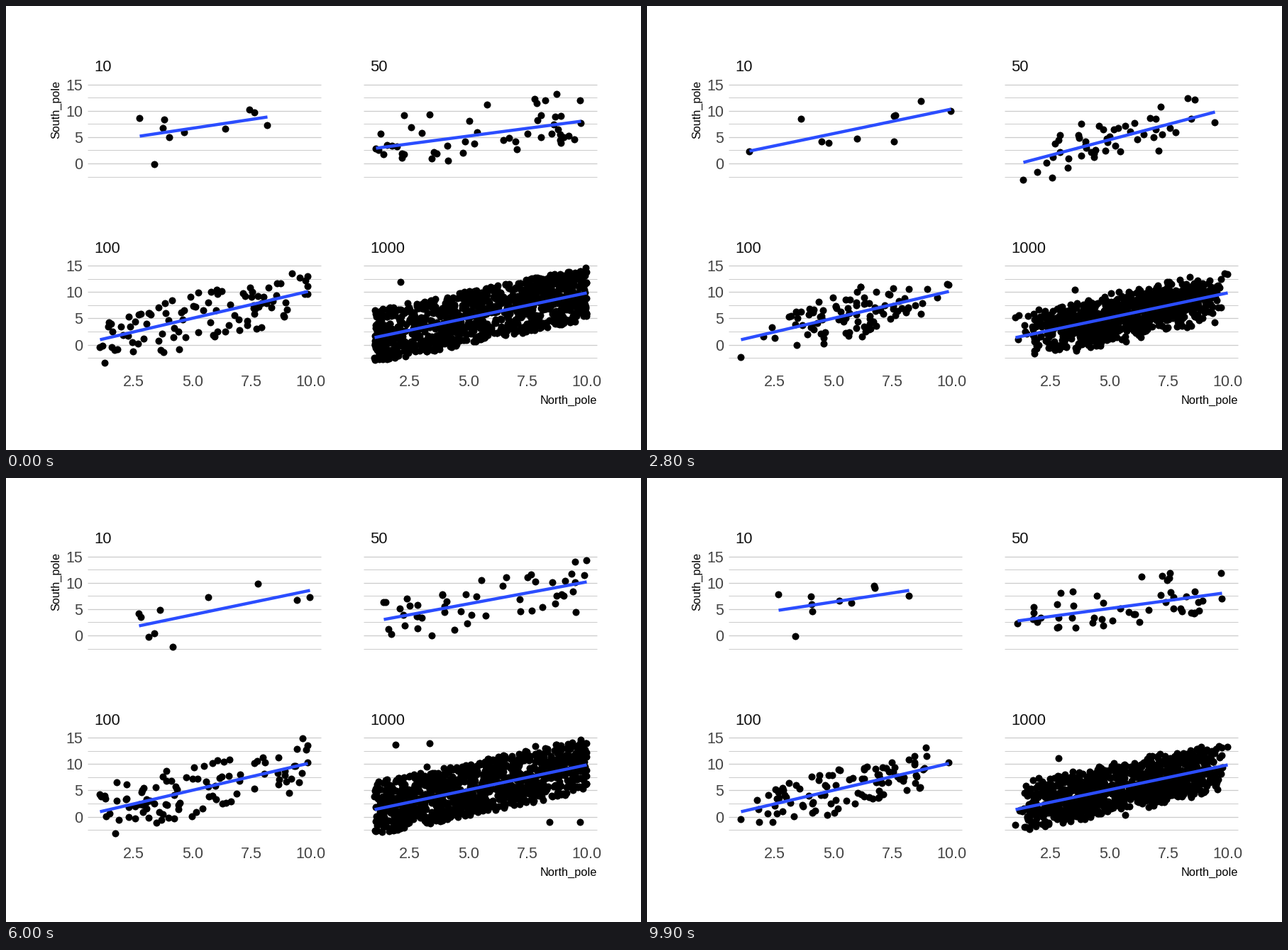
A matplotlib script that plays this animation: 895x626 px, repeating every 10 s.

```python
import numpy as np
import matplotlib.pyplot as plt
from matplotlib.animation import FuncAnimation

W, H, DPI = 895, 626, 64
PT = 72 / DPI                      # points per pixel
STATES, HOLD, MOVE = 10, 5, 5      # frames held and frames in between, per state
X0, Y0 = 96.5, 221.5               # data origin of the first panel
X_UNIT, Y_UNIT = 33.2, 7.43        # pixels per data unit
COL, ROW = 389, 255.5              # panel spacing
FONT = "Liberation Sans"

rng = np.random.default_rng(12)

# Ends of the trend line (x, y, x, y) in each state; small samples wander most
TRENDS = {
    10: [(188, 183, 368, 156), (148, 204, 391, 146), (144, 204, 428, 145),
         (144, 204, 428, 145), (163, 237, 407, 150), (160, 215, 415, 152),
         (187, 208, 428, 158), (166, 206, 395, 144), (166, 206, 395, 144),
         (170, 201, 374, 168)],
    50: [(521, 200, 810, 162), (522, 204, 818, 154), (530, 220, 800, 149),
         (530, 220, 800, 149), (521, 223, 817, 128), (525, 212, 812, 145),
         (532, 199, 818, 146), (527, 216, 797, 151), (527, 216, 797, 151),
         (526, 206, 810, 162)],
    100: [(132, 470, 425, 402)] * STATES,
    1000: [(519, 467, 818, 404)] * STATES,
}


def sample(n, trend):
    """Uniform noise around a line, kept so that its linear fit is that line."""
    x0, y0, x1, y1 = trend
    x = rng.uniform(x0, x1, n)
    x[:2] = x0, x1
    noise = rng.uniform(-5, 5, n) * Y_UNIT
    noise -= np.polyval(np.polyfit(x, noise, 1), x)
    y = y0 + (y1 - y0) * (x - x0) / (x1 - x0) + noise
    strays = n // 150
    y[2:2 + strays] = Y0 + ROW - Y_UNIT * rng.uniform(-3, 14, strays)
    return np.column_stack([x, y])


fig = plt.figure(figsize=(W / DPI, H / DPI), dpi=DPI, facecolor="white")
ax = fig.add_axes([0, 0, 1, 1])
# Whole numbers are pixel centres
ax.set(xlim=(-0.5, W - 0.5), ylim=(H - 0.5, -0.5))
ax.axis("off")


def label(x, y, text, size, color="black", **kw):
    ax.text(x, y, text, fontsize=size * PT, color=color, family=FONT,
            va="baseline", **kw)


def draw_panel(name, dx, dy):
    for value in np.arange(-2.5, 15.1, 2.5):
        major = value % 5 == 0
        y = Y0 + dy - Y_UNIT * value
        ax.plot([115 + dx, 444 + dx], [y, y], color="#cccccc",
                lw=(1.3 if major else 1.0) * PT, solid_capstyle="butt")
        if major and dx == 0:
            label(108, y + 8, f"{value:.0f}", 21.5, "#444444", ha="right")
    if dy:
        for value in (2.5, 5, 7.5, 10):
            label(X0 + dx + X_UNIT * value, 535.5, f"{value:.1f}", 21.5,
                  "#444444", ha="center")
    label(124 + dx, 91.5 + dy, name, 22, "#111111")


layers = []    # (artist, its coordinates in each state)
for i, (n, trends) in enumerate(TRENDS.items()):
    draw_panel(str(n), COL * (i % 2), ROW * (i // 2))
    dots, = ax.plot([], [], "o", color="black", ms=10 * PT, mew=0,
                    snap=False, zorder=3)
    line, = ax.plot([], [], color="#2b4dff", lw=4.4 * PT,
                    solid_capstyle="butt", zorder=4)
    layers.append((dots, [sample(n, trend) for trend in trends]))
    layers.append((line, [np.reshape(trend, (2, 2)) for trend in trends]))

label(833, 560.5, "North_pole", 16.4, ha="right")
label(75, 104, "South_pole", 16.3, ha="right", rotation=90, rotation_mode="anchor")


def update(frame):
    k, step = divmod(frame, HOLD + MOVE)
    p = max(0, step - HOLD + 1) / (MOVE + 1)
    for artist, states in layers:
        artist.set_data(*((1 - p) * states[k] + p * states[(k + 1) % STATES]).T)
    return [artist for artist, _ in layers]


anim = FuncAnimation(fig, update, frames=STATES * (HOLD + MOVE), interval=100,
                     repeat=True, repeat_delay=0)
plt.show()
```
